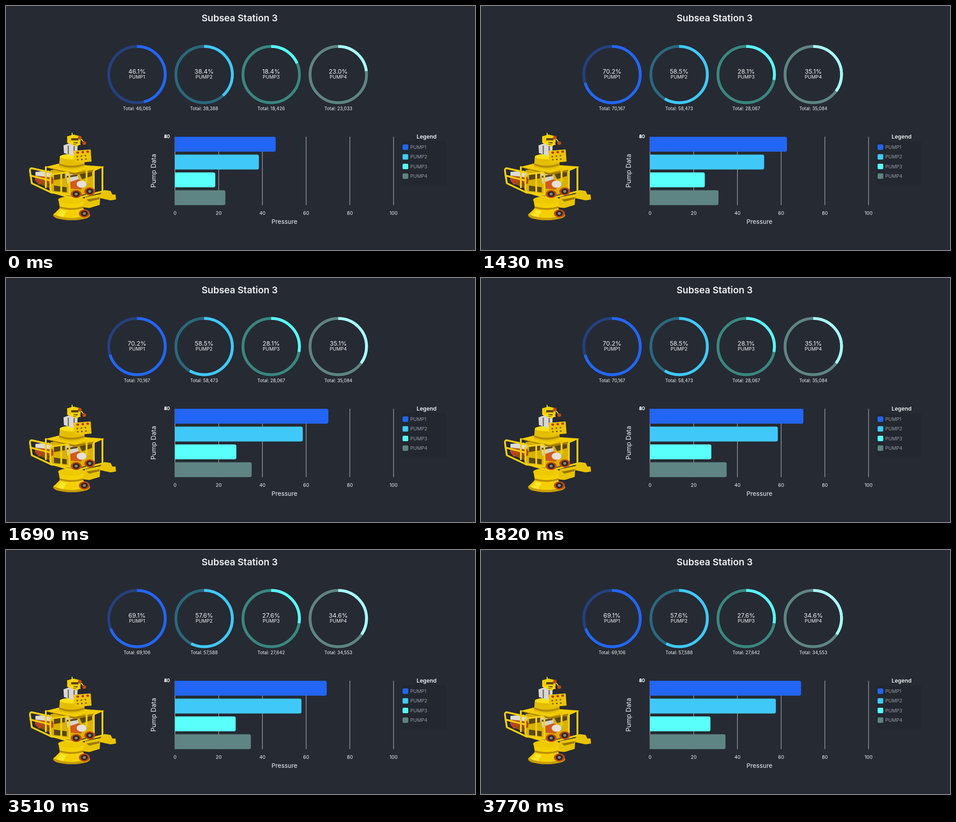
An HTML page for the animation above (4.29 s loop, 1036x541 px).

```html
<!DOCTYPE html>
<html lang="en">
<head>
<meta charset="utf-8">
<title>Subsea Station 3</title>
<style>
  html, body { margin: 0; width: 100%; height: 100%; overflow: hidden; background: #262a33; }
  svg { display: block; width: 1036px; height: 541px; text-anchor: middle; }
  text { font-family: Inter, "Open Sans", sans-serif; fill: #f1f2f3; }
</style>
</head>
<body>
<svg id="stage" viewBox="0 0 1036 541">
  <g id="machine" stroke-linejoin="round" stroke-linecap="round">
    <!-- base and lower arm -->
    <path fill="#e9c400" d="M174 424L208 417L217 408L231 410L235 418L242 418L243 429L231 431L208 426L207 441L184 448L168 446Z"/>
    <path fill="#9b7902" d="M178 429L207 424V428L184 434Z"/>
    <ellipse cx="145" cy="464" rx="41" ry="11" fill="#c79e00"/>
    <path fill="#f4d000" d="M116 430H173L170 448L184 462Q146 478 105 462L119 448Z"/>
    <path fill="#b98f00" d="M119 444Q145 452 171 444V448Q145 456 118 448Z"/>
    <path fill="#ffe62d" d="M122 452L112 464L126 468L134 455Z"/>
    <ellipse cx="145" cy="430" rx="30" ry="8" fill="#edc900"/>
    <!-- frame interior -->
    <path fill="#d9b100" d="M98 364L131 360L192 364V412L150 424L100 410Z"/>
    <path fill="#594619" d="M106 372L130 368V382L106 386ZM106 398L134 402V413L106 410ZM162 372L190 368V377L168 384Z"/>
    <path fill="#d7d3cc" d="M132 371L158 369L161 387L136 394Z"/>
    <path fill="#554326" d="M134 377L158 373V377L135 381Z"/>
    <path fill="#b7461b" d="M65 371L99 376L105 384L104 394L72 396L64 386Z"/>
    <path fill="#dedbd3" d="M65 368L95 365L105 373L99 380L65 376Z"/>
    <path fill="#d15a20" d="M142 390L160 384L178 394L165 407L143 405Z"/>
    <ellipse cx="167" cy="395" rx="11" ry="8" fill="#e8e0d6"/>
    <path fill="#8a5411" d="M74 394L92 386L97 404L88 401Z"/>
    <!-- deck and tower -->
    <path fill="#f2cc00" d="M86 357L118 349L218 356L195 366L172 363L152 371Z"/>
    <path fill="#a77f00" d="M87 358L152 370L193 363V367L152 375Z"/>
    <path fill="#e5bd00" d="M119 333Q146 324 174 335L173 357Q146 367 117 357Z"/>
    <ellipse cx="146" cy="334" rx="27" ry="6" fill="#ffe01a"/>
    <path fill="#b68d00" d="M117 349Q144 359 174 349V353Q144 364 117 353Z"/>
    <path fill="#d8d7d2" d="M127 309L141 304L158 309V328L146 332L128 326Z"/>
    <path fill="#7d7768" d="M136 310L139 309V329L136 328ZM149 311L152 310V325L149 326Z"/>
    <path fill="#f4cf00" d="M135 289L149 285L166 289L164 306L157 312L135 303Z"/>
    <path fill="#594719" d="M144 293H160V298H144ZM149 302H158V307H149Z"/>
    <path fill="#edc500" d="M149 321L187 318L189 345L151 348Z"/>
    <path stroke="#ffe32c" stroke-width="2" fill="none" d="M136 302L164 307M146 282V292M164 292L173 304"/>
    <g fill="#bd4b19"><circle cx="163" cy="292" r="4"/><circle cx="173" cy="304" r="4"/></g>
    <path stroke="#bc3a16" stroke-width="5" stroke-dasharray="1 10" d="M158 325L181 323"/>
    <path stroke="#765b13" stroke-width="3" stroke-dasharray="1 8" d="M157 334L182 331M158 341L183 339"/>
    <!-- cage -->
    <g fill="none" stroke="#f4cf10" stroke-width="4">
      <path d="M98 369L58 360Q52 359 53 366L57 393L101 414M54 376L98 387M88 357L88 402"/>
      <path d="M104 373L134 369Q140 369 140 376V418L104 414Q98 412 98 405V379Q98 374 104 373Z"/>
      <path d="M100 412L151 427L214 411M194 365V414M213 358V409M122 372V415M178 365V389"/>
    </g>
    <g id="wheels"></g>
  </g>
  <rect x="872" y="299" width="101" height="97" fill="#23272f"/>
</svg>
<script>
const stage = document.getElementById('stage');
const LOOP = 4290, STEP = 130;
const ORIGIN = 373.3, UNIT = 4.828;
const pumps = [
  { ratio: 1, color: '#2366f5', track: '#24417f', arc: '#2366f5' },
  { ratio: 5 / 6, color: '#40c9f8', track: '#2b687e', arc: '#40c9f8' },
  { ratio: 2 / 5, color: '#59fffb', track: '#398780', arc: '#59fffb' },
  { ratio: 1 / 2, color: '#5e8583', track: '#5e8583', arc: '#a9fffc' }
];
const readings = [
  { at: 0, value: 46065 },
  { at: 1300, value: 70167 },
  { at: 3380, value: 69106 }
];

function add(tag, attrs, parent = stage) {
  const el = document.createElementNS('http://www.w3.org/2000/svg', tag);
  for (const key in attrs) el.setAttribute(key, attrs[key]);
  return parent.appendChild(el);
}

function label(text, x, y, size, attrs = {}) {
  const el = add('text', { x, y, 'font-size': size, ...attrs });
  el.textContent = text;
  return el;
}

const wheels = document.getElementById('wheels');
for (const [cx, cy] of [[155, 417], [185, 411], [173, 460]]) {
  add('ellipse', { cx, cy, rx: 12, ry: 9, fill: '#c64a1b' }, wheels);
  add('ellipse', { cx, cy, rx: 8, ry: 6.5, fill: '#30281f' }, wheels);
  add('ellipse', { cx, cy, rx: 3.5, ry: 3, fill: '#8c8172' }, wheels);
}

label('Subsea Station 3', 516, 34, 20.6, { 'font-weight': 600 });
label('Pressure', 615, 483, 13.7);
label('Pump Data', 0, 0, 14.5, { transform: 'translate(331 365.5) rotate(-90)' });
label('Legend', 929, 293.5, 12.2, { 'font-weight': 600 });
for (const tick of [20, 40, 60, 80]) label(tick, 362, 293, 10.2, { 'text-anchor': 'end' });

for (let tick = 0; tick <= 100; tick += 20) {
  const x = ORIGIN + tick * UNIT;
  add('line', { x1: x, x2: x, y1: 290, y2: 441.5, stroke: '#a6a9ad', 'stroke-width': 1.3 });
  label(tick, x, 463, 10.6);
}

pumps.forEach((pump, i) => {
  const name = 'PUMP' + (i + 1);
  const cx = 289.4 + 148.2 * i, cy = 152;
  const ring = { cx, cy, r: 62.4, fill: 'none', 'stroke-width': 6.3 };
  add('circle', { ...ring, stroke: pump.track });
  pump.ring = add('circle', {
    ...ring, stroke: pump.arc, pathLength: 100, transform: `rotate(-90 ${cx} ${cy})`
  });
  pump.percent = label('', cx, 150, 13.6);
  label(name, cx, 161, 10.6);
  pump.total = label('', cx, 230.5, 10);
  pump.bar = add('path', { fill: pump.color });
  const y = 307 + 21.4 * i;
  add('rect', { x: 876, y, width: 12.5, height: 12, rx: 2, fill: pump.color });
  label(name, 893, y + 9.7, 10.6, { 'text-anchor': 'start', style: 'fill:#969ca9' });
});

// cubic-bezier(.25, .1, .25, 1)
function ease(x) {
  if (x <= 0 || x >= 1) return x <= 0 ? 0 : 1;
  const curve = (a, b, s) => 3 * a * s * (1 - s) ** 2 + 3 * b * s * s * (1 - s) + s ** 3;
  let low = 0, high = 1;
  for (let n = 0; n < 20; n++) {
    const mid = (low + high) / 2;
    if (curve(.25, .25, mid) < x) low = mid; else high = mid;
  }
  return curve(.1, 1, low);
}

function draw(time) {
  const t = Math.floor((time % LOOP) / STEP) * STEP;
  const index = readings.filter(r => r.at <= t).length - 1;
  const { at, value } = readings[index];
  const before = index ? readings[index - 1].value : value;
  const shown = before + (value - before) * ease((t - at + 48) / 440);
  pumps.forEach((pump, i) => {
    const amount = Math.round(+(value * pump.ratio).toFixed(3));
    const percent = amount / 1000;
    pump.percent.textContent = percent.toFixed(1) + '%';
    pump.total.textContent = 'Total: ' + amount.toLocaleString('en-US');
    pump.ring.setAttribute('stroke-dasharray', `${percent} 100`);
    const width = shown * pump.ratio / 1000 * UNIT;
    const top = 290 + 39.5 * i;
    pump.bar.setAttribute('d', `M${ORIGIN - .3} ${top}h${width - 3.7}q4 0 4 4v25q0 4-4 4h${3.7 - width}z`);
  });
}

function tick() {
  draw(performance.now());
  requestAnimationFrame(tick);
}
tick();
</script>
</body>
</html>
```
